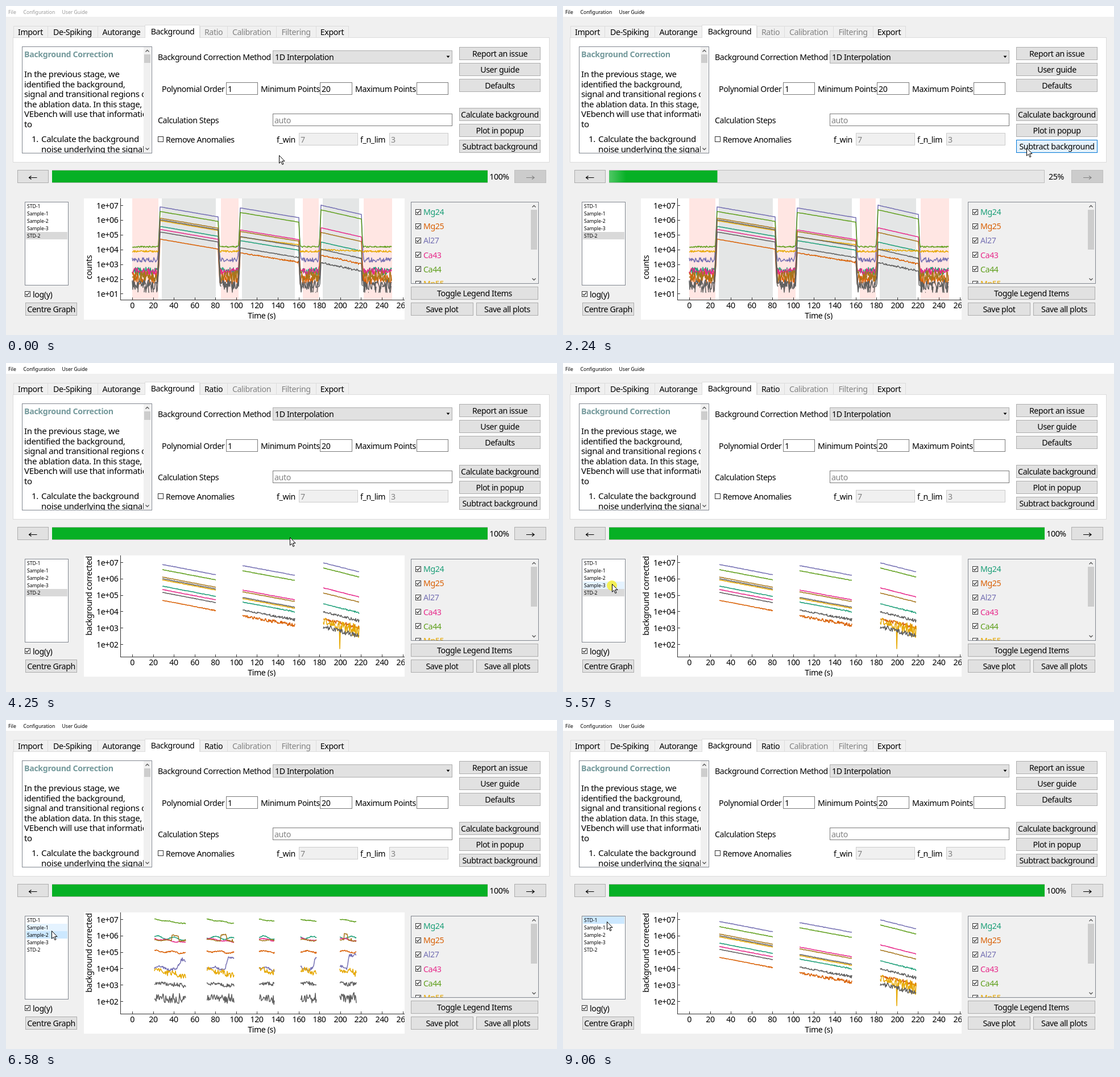
An HTML page for the animation above (9140 ms loop, 969 px wide and 578 px high).

```html
<!DOCTYPE html>
<html lang="en">
<head>
<meta charset="utf-8">
<title>Background correction</title>
<style>
html, body { margin: 0; width: 100%; height: 100%; overflow: hidden; background: #f0f0f0; }
svg { display: block; width: 100vw; height: 100vh; }
text { font: 14.2px "Noto Sans", "DejaVu Sans", sans-serif; letter-spacing: -.4px; white-space: pre; }
.small { font-size: 8.6px; letter-spacing: 0; }
.doc { font-size: 15px; letter-spacing: -.35px; }
.head { font-weight: bold; letter-spacing: -.35px; }
.line { fill: none; stroke-width: 1.5; stroke-linejoin: round; }
</style>
</head>
<body>
<svg id="stage" viewBox="0 0 969 578"></svg>
<script>
const LOOP = 9140;
const COLORS = ['#1b9e77', '#d95f02', '#7570b3', '#e7298a', '#5f9f1c', '#e6a802', '#a6761d', '#606060'];
const stage = document.getElementById('stage');
const $ = id => document.getElementById(id);
const clamp = v => Math.max(0, Math.min(1, v));
const smooth = v => (v = clamp(v), v * v * (3 - 2 * v));

// ---- drawing helpers -------------------------------------------------
const rect = (x, y, x2, y2, fill, stroke = 'none', extra = '') => {
  const o = stroke === 'none' ? 0 : .5;
  return `<rect x="${x + o}" y="${y + o}" width="${x2 - x - 2 * o}" height="${y2 - y - 2 * o}" fill="${fill}" stroke="${stroke}" ${extra}/>`;
};
const text = (x, y, s, fill = '#000', extra = '') => `<text x="${x}" y="${y}" fill="${fill}" ${extra}>${s}</text>`;
const mid = (x, y, s, fill = '#000', extra = '') => text(x, y, s, fill, 'text-anchor="middle" ' + extra);
const button = (x, y, x2, y2, label, id = 'none') =>
  rect(x, y, x2, y2, '#e1e1e1', '#adadad', `id="${id}"`) + mid((x + x2) / 2, (y + y2) / 2 + 5.3, label);
const check = (x, y, on) => rect(x, y, x + 10, y + 10, '#fff', '#333') +
  (on ? `<path d="M${x + 2} ${y + 5}l2 2.4 4-5" fill="none" stroke="#222" stroke-width="1.2"/>` : '');
const chevron = (x, y, d) => `<path d="M${x - 3} ${y + 1.5 * d}l3 ${-3 * d} 3 ${3 * d}" fill="none" stroke="#555" stroke-width="1.3"/>`;
const scrollbar = (x, y, y2, t, t2) => rect(x, y, x + 13, y2, '#f0f0f0') + rect(x + 1, t, x + 12, t2, '#cdcdcd') +
  chevron(x + 6.5, y + 7, 1) + chevron(x + 6.5, y2 - 7, -1);
const arrow = (x, d, id) => `<path id="${id}" d="M${x - 7} 301.5h14M${x + 7 * d - 4 * d} 298.5l${4 * d} 3 ${-4 * d} 3" fill="none" stroke="#000" stroke-width="1.2"/>`;

// ---- plot data -------------------------------------------------------
function random(seed) {
  return () => {
    seed = seed + 0x6D2B79F5 | 0;
    let t = Math.imul(seed ^ seed >>> 15, 1 | seed);
    t = t + Math.imul(t ^ t >>> 7, 61 | t) ^ t;
    return ((t ^ t >>> 14) >>> 0) / 4294967296;
  };
}
function curve(points, color) {
  let pen = 'M', d = '';
  for (const p of points) {
    if (p) d += pen + p[0] + ' ' + p[1].toFixed(1);
    pen = p ? 'L' : 'M';
  }
  return `<path class="line" d="${d}" stroke="${COLORS[color]}"/>`;
}

// colour, background level, background noise, start level in each ablation
const STD = [
  [0, 466, 7, 392, 420, 423], [1, 478, 11, 417, 444, 449], [2, 446, 4, 354, 356, 351],
  [3, 466, 6, 398, 399, 395], [4, 423, 1.3, 363, 365, 360], [5, 431, 1.6, 381, 414, 455],
  [6, 475, 10, 376, 402, 404], [7, 490, 9, 379, 412, 437], [7, 494, 0, 403, 434, 463]
];
const SPANS = [[275, 369], [416, 508], [558, 621]];
const WINDOWS = [[271, 373], [412, 515], [554, 625]];
const DROP = [18, 17, 16];
const level = (row, b, x) => row[3 + b] + DROP[b] * (x - SPANS[b][0]) / (SPANS[b][1] - SPANS[b][0]);
const jitter = y => .4 + Math.max(0, y - 428) * .1;

function rawPlot() {
  return STD.map((row, i) => {
    const rnd = random(i + 5), pts = [];
    for (let x = 222; x <= 678; x++) {
      let signal = Infinity;
      WINDOWS.forEach(([a, z], b) => {
        const out = Math.max(0, a - x, x - z);
        signal = Math.min(signal, 350 + .9 * (level(row, b, x) - 350) + out * 24);
      });
      signal += (rnd() - .5) * jitter(Math.min(signal, 460));
      const base = i === 8 ? [485, 493, 493, 503][Math.floor(rnd() * 4)]
        : Math.min(505, row[1] + (rnd() * 2 - 1) * row[2]);
      const sum = 10 ** (-signal / 25.9) + 10 ** (-base / 25.9);
      pts.push(i === 8 && signal > 520 && rnd() < .25 ? null : [x, -25.9 * Math.log10(sum)]);
    }
    return curve(pts, row[0]);
  }).join('');
}

function standardPlot() {
  return STD.map((row, i) => {
    const rnd = random(i + 40), pts = [];
    SPANS.forEach(([a, z], b) => {
      for (let x = a; x <= z; x++) {
        const y = level(row, b, x), wide = row[0] === 5 && b === 2 ? 2.5 : 1;
        pts.push([x, wide > 1 && x === 587 ? 502 : y + (rnd() * 2 - 1) * jitter(y) * wide]);
      }
      pts.push(null);
    });
    return curve(pts, row[0]);
  }).join('');
}

// colour, start level, drift, noise, slow wobble
const SAMPLE = [
  [0, 381, 4, .8, 2.5], [1, 406, 3, 1.2, 1.5], [2, 434, 0, 2.5, 2], [3, 384, 7, .8, 1], [4, 350, 8, .7, .6],
  [5, 438, 12, 5, 2], [6, 386, 3, .8, 1], [7, 462, 5, 3.5, 1], [7, 488, 2, 9, 1]
];
const RISE = [.7, .62, 2, .75, .4], BUMP = [.55, .5, 2, 2, .25];

function samplePlot(spans, seed) {
  return SAMPLE.map(([color, start, drift, noise, wobble], i) => {
    const rnd = random(seed * 100 + i), pts = [];
    spans.forEach(([a, z], b) => {
      const phase = rnd() * 6;
      for (let x = a; x <= z; x++) {
        const u = (x - a) / (z - a), scale = (z - a) / 55;
        let y = start + drift * u * scale + wobble * Math.sin(phase + x / 4.5) + (rnd() * 2 - 1) * noise * (.7 + u * .5);
        if (color === 2) y += 6 * u - (b === 4 ? 26 : 20) * smooth((u - RISE[b]) * 5);
        if (color === 6 && u > BUMP[b] && u < BUMP[b] + .45) y -= 10 * smooth(1.5 * Math.sin((u - BUMP[b]) * 14) + .6);
        pts.push([x, Math.min(y, 515)]);
      }
      pts.push(null);
    });
    return curve(pts, color);
  }).join('');
}

function axes(title, titleY, top, bottom, step) {
  let s = text(0, 0, title, '#000', `text-anchor="middle" transform="translate(151 ${titleY}) rotate(-90)"`);
  for (let e = top; e >= bottom; e--) {
    const y = 350 + (top - e) * step;
    s += text(197.5, y + 5.5, '1e+0' + e, '#000', 'text-anchor="end"') + rect(202, Math.round(y), 206, Math.round(y) + 1, '#333');
  }
  return s;
}

function plots() {
  let s = rect(137, 338, 701, 551, '#fff');
  let bands = '';
  for (const [a, z] of [[222, 268], [378, 409], [522, 550], [629, 679]]) bands += rect(a, 338, z, 516, '#ffe6e3');
  for (const [a, z] of [[274, 369], [415, 508], [557, 621]]) bands += rect(a, 338, z, 516, '#e4e6e6');
  s += `<g id="raw">${bands}${rawPlot()}${axes('counts', 459, 7, 1, 25.9)}</g>`;
  s += `<g id="corrected">${axes('background corrected', 409, 7, 2, 28.8)}</g>`;
  s += `<g id="std">${standardPlot()}</g>`;
  s += `<g id="s1">${samplePlot([[262, 312], [345, 401], [440, 490], [530, 566], [608, 653]], 1)}</g>`;
  s += `<g id="s2">${samplePlot([[261, 316], [353, 401], [445, 472], [518, 546], [587, 616]], 2)}</g>`;
  s += `<g id="s3">${samplePlot([[258, 306], [340, 388], [430, 470], [508, 548], [580, 615]], 3)}</g>`;
  s += rect(201, 338, 202, 517, '#333') + rect(201, 516, 701, 517, '#333');
  for (let v = 0; v <= 260; v += 20) {
    const x = Math.round(222 + v * 1.829);
    s += mid(x, 531, v) + rect(x, 512, x + 1, 516, '#333');
  }
  return `<g clip-path="url(#plotClip)">${s}${mid(449.5, 548.5, 'Time (s)')}</g>`;
}

// ---- window ----------------------------------------------------------
const ITEMS = ['STD-1', 'Sample-1', 'Sample-2', 'Sample-3', 'STD-2'];
const GREY = '#838383';

function tabs() {
  const names = ['Import', 'De-Spiking', 'Autorange', 'Background', 'Ratio', 'Calibration', 'Filtering', 'Export'];
  const edges = [13, 73, 161, 245, 341, 389, 475, 545, 602];
  let s = rect(12, 55, 956, 275, '#fff', '#dcdcdc');
  names.forEach((name, i) => {
    const a = edges[i], z = edges[i + 1], open = i === 3;
    s += open ? rect(a - 1, 33, z, 57, '#fff') + `<path d="M${a - .5} 56V33.5H${z - .5}V56" fill="none" stroke="#dcdcdc"/>`
      : rect(a, 35, z + 1, 56, '#f0f0f0', '#dcdcdc');
    s += mid((a + z) / 2, open ? 50 : 51, name, i > 3 && i < 7 ? GREY : '#000', `id="tab${i}"`);
  });
  return s;
}

function help() {
  const lines = ['In the previous stage, we', 'identified the background,', 'signal and transitional regions of',
    'the ablation data. In this stage,', 'VEbench will use that information', 'to'];
  return rect(28, 71, 257, 259, '#fff', '#828790') + '<g clip-path="url(#helpClip)">' +
    text(32, 90, 'Background Correction', '#74999b', 'class="head"') +
    lines.map((l, i) => text(32, 125 + i * 17.5, l, '#000', 'class="doc"')).join('') +
    text(45, 239, '1.', '#000', 'class="doc"') + text(62, 239, 'Calculate the background', '#000', 'class="doc"') +
    text(62, 256.5, 'noise underlying the signal', '#000', 'class="doc"') + '</g>' + scrollbar(242, 72, 258, 85, 100);
}

function form() {
  const field = (x, y, x2, y2, s, off) => rect(x, y, x2, y2, off ? '#f0f0f0' : '#fff', off ? '#ccc' : '#7a7a7a') +
    text(x + 3, y + 16.5, s, off || s === 'auto' ? '#808080' : '#000');
  return text(267, 95, 'Background Correction Method') + rect(469, 78, 785, 101, '#e1e1e1', '#adadad') +
    text(473, 95, '1D Interpolation') + '<path d="M774.5 87.5h6l-3 3.5z"/>' +
    text(274, 151, 'Polynomial Order') + field(387, 134, 443, 156, '1') +
    text(448, 151, 'Minimum Points') + field(552, 134, 609, 156, '20') +
    text(614, 151, 'Maximum Points') + field(722, 134, 778, 156, '') +
    text(267, 206, 'Calculation Steps') + field(469, 189, 785, 211, 'auto') +
    check(267, 229) + text(281, 240, 'Remove Anomalies') +
    text(476, 240, 'f_win') + field(515, 223, 619, 245, '7', true) +
    text(623, 240, 'f_n_lim') + field(674, 223, 778, 245, '3', true) +
    ['Report an issue', 'User guide', 'Defaults'].map((l, i) => button(797, 72 + 28 * i, 940, 95 + 28 * i, l)).join('') +
    ['Calculate background', 'Plot in popup', 'Subtract background']
      .map((l, i) => button(797, 179 + 28 * i, 940, 202 + 28 * i, l, 'act' + i)).join('');
}

function legend() {
  const names = ['Mg24', 'Mg25', 'Al27', 'Ca43', 'Ca44', 'Mn55'];
  return rect(712, 344, 937, 488, '#f0f0f0', '#828790') + '<g clip-path="url(#legendClip)">' +
    names.map((n, i) => check(720, Math.round(357 + i * 25.1), true) + text(734, 367 + i * 25.2, n, COLORS[i])).join('') +
    '</g>' + scrollbar(922, 345, 487, 358, 428) + button(712, 493, 936, 516, 'Toggle Legend Items') +
    button(712, 521, 822, 544, 'Save plot') + button(827, 521, 936, 544, 'Save all plots');
}

function build() {
  const clip = (id, x, y, x2, y2) => `<clipPath id="${id}">${rect(x, y, x2, y2, '#000')}</clipPath>`;
  stage.innerHTML = '<defs>' + clip('plotClip', 137, 338, 701, 551) + clip('helpClip', 29, 72, 242, 258) +
    clip('legendClip', 713, 345, 922, 487) +
    '<linearGradient id="shine"><stop stop-color="#fff" stop-opacity=".3"/><stop offset="1" stop-color="#fff" stop-opacity="0"/></linearGradient></defs>' +
    rect(0, 0, 969, 578, '#f0f0f0') + rect(0, 0, 969, 19, '#fff') +
    `<g id="menu">${[[4, 'File'], [30.5, 'Configuration'], [98.5, 'User Guide']].map(([x, s]) => text(x, 14, s, 'inherit', 'class="small"')).join('')}</g>` +
    tabs() + help() + form() +
    button(20, 288, 75, 311, '') + arrow(47.5, -1, 'prev') +
    rect(894, 288, 950, 311, '#ccc', '#bfbfbf', 'id="nextBox"') + arrow(922, 1, 'next') +
    rect(81, 288, 847, 311, '#e6e6e6', '#bcbcbc') + rect(81, 289, 847, 310, '#06b025', 'none', 'id="bar"') +
    rect(81, 289, 111, 310, 'url(#shine)', 'none', 'id="glow"') + mid(867.5, 305, '', '#000', 'id="percent"') +
    rect(33, 344, 110, 491, '#fff', '#828790') +
    ITEMS.map((s, i) => rect(35, 345 + 13 * i, 108, 358 + 13 * i, '#fff', 'none', `id="row${i}"`) +
      text(37, 355 + 13 * i, s, '#000', 'class="small"')).join('') +
    check(33, 501, true) + text(47, 511.5, 'log(y)') + button(34, 521, 125, 544, 'Centre Graph') +
    plots() + legend() +
    '<circle id="click" r="9" fill="#f6ee2c" opacity=".8"/>' +
    '<path id="cursor" d="M.5 .5V14.2L3.6 11.3 5.9 16.5 8 15.6 5.7 10.5H10Z" fill="#fff" stroke="#000"/>';
}

// ---- timeline --------------------------------------------------------
// start, end, steps, bend x/y, target x/y
const MOVES = [
  [470, 1310, 12, 640, 290, 800, 254], [1390, 1620, 4, 808, 250, 815, 249],
  [3790, 4650, 12, 500, 300, 179, 373], [4720, 5110, 6, 120, 376, 86, 388],
  [5950, 6110, 3, 84, 383, 82, 378], [6410, 6580, 3, 81, 374, 80, 370],
  [6880, 7200, 5, 78, 362, 76, 354], [9060, 9060, 1, 77, 354, 77, 354]
];
const CLICKS = [[1770, 1930], [5570, 5720], [6110, 6260], [6730, 6880], [7200, 7440]];

function pointer(t) {
  let x = 480, y = 262;
  for (const [start, end, n, bx, by, tx, ty] of MOVES) {
    if (t < start) break;
    const dt = (end - start) / (n - 1 || 1) || 1;
    const u = smooth(Math.min(n, Math.floor((t - start) / dt + 1.001)) / n), v = 1 - u;
    x = v * v * x + 2 * u * v * bx + u * u * tx;
    y = v * v * y + 2 * u * v * by + u * u * ty;
  }
  return [Math.round(x), Math.round(y)];
}

// last value whose time has come
const stepAt = (t, first, ...steps) => steps.reduce((v, [at, next]) => t >= at ? next : v, first);
const blend = (a, b, u) => `rgb(${a.map((v, i) => Math.round(v + (b[i] - v) * u))})`;
const show = (id, on) => $(id).setAttribute('visibility', on ? 'visible' : 'hidden');
const fill = (id, c) => $(id).setAttribute('fill', c);

function update(t) {
  const [x, y] = pointer(t);
  $('cursor').setAttribute('transform', `translate(${x} ${y})`);
  $('click').setAttribute('transform', `translate(${x} ${y + 3})`);
  show('click', CLICKS.some(([a, z]) => t >= a && t < z));

  fill('menu', t < 1770 ? '#999' : '#000');
  const hover = clamp((t - 1200) / 240) - clamp((t - 3850) / 240);
  const pressed = t >= 1770 && t < 1930;
  fill('act2', pressed ? '#cce4f7' : blend([225, 225, 225], [229, 241, 251], hover));
  $('act2').setAttribute('stroke', pressed ? '#005499' : blend([173, 173, 173], [0, 120, 215], hover));

  const done = stepAt(t, 100, [1930, 0], [2160, 25], [2460, 50], [2630, 75], [2780, 100]);
  $('bar').setAttribute('width', Math.max(0, 766 * done / 100 - (done && done < 100 ? 1 : 0)));
  $('percent').textContent = done + '%';
  show('glow', t >= 2240 && t < 2460);

  const ready = t >= 2780;
  fill('tab4', ready ? '#000' : GREY);
  fill('nextBox', ready ? '#e1e1e1' : '#ccc');
  $('nextBox').setAttribute('stroke', ready ? '#adadad' : '#bfbfbf');
  $('next').setAttribute('stroke', ready ? '#000' : GREY);

  const selected = stepAt(t, 4, [5640, 3], [6180, 2], [6800, 1], [7370, 0]);
  const over = x > 33 && x < 110 ? Math.floor((y - 345) / 13) : -1;
  ITEMS.forEach((_, i) => fill('row' + i,
    i === selected ? (t < 5640 ? '#d9d9d9' : '#cce8ff') : i === over ? '#e5f3ff' : '#fff'));

  show('raw', !ready);
  show('corrected', ready);
  show('std', ready && selected % 4 === 0);
  for (const i of [1, 2, 3]) show('s' + i, ready && selected === i);
}

build();
const begin = performance.now();
function tick() {
  update((performance.now() - begin) % LOOP);
  requestAnimationFrame(tick);
}
tick();
</script>
</body>
</html>
```
